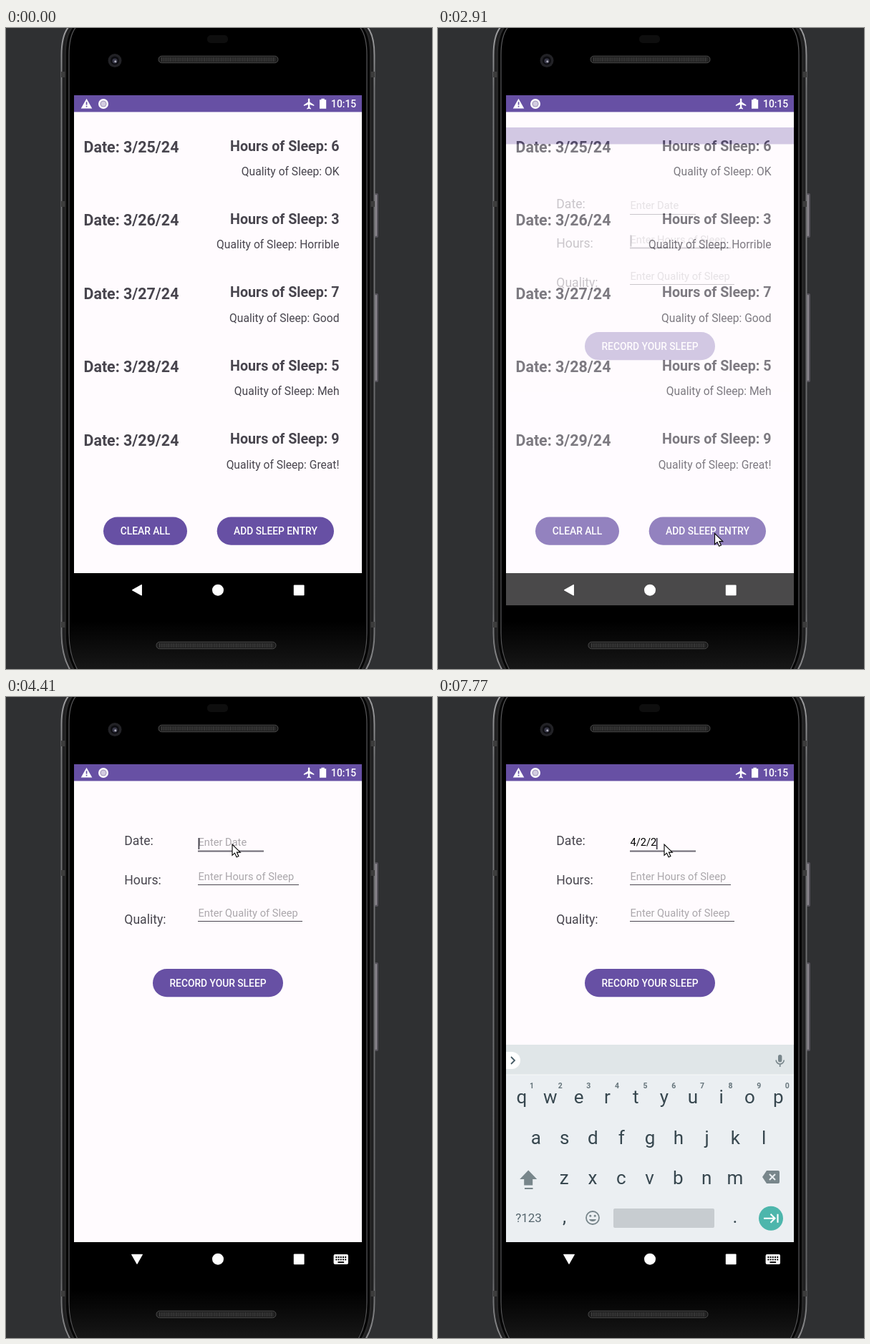
An HTML page that plays this animation: 595 by 896 pixels, repeating every 8000 ms.

```html
<!DOCTYPE html>
<html lang="en">
<head>
<meta charset="utf-8">
<title>Sleep log</title>
<style>
html, body { margin: 0; width: 100%; height: 100%; overflow: hidden; background: #2f3032; }
svg { display: block; width: 595px; height: 896px; font-family: Roboto, Arial, sans-serif; }
.date { font: 700 21.4px Roboto, sans-serif; fill: #48454e; }
.hours { font: 700 19.65px Roboto, sans-serif; fill: #48454e; text-anchor: end; }
.quality { font-size: 15.63px; fill: #48454e; text-anchor: end; }
.btn { font: 500 13.8px Roboto, sans-serif; fill: #fff; text-anchor: middle; }
.label { font-size: 17.6px; fill: #48454e; }
.hint { font-size: 14.65px; fill: #aaa7ab; }
.typed { font-size: 14.65px; fill: #000; }
.key { font-size: 26px; fill: #37474f; text-anchor: middle; }
.num { font: 700 10.5px Roboto, sans-serif; fill: #66757c; text-anchor: middle; }
</style>
</head>
<body>
<svg id="stage" viewBox="0 0 595 896"></svg>
<script>
const PURPLE = '#6750a4', PAPER = '#fffbfe', GREY = '#78868b';
const rect = (x, y, w, h, fill, r = 0, more = '') =>
  `<rect x="${x}" y="${y}" width="${w}" height="${h}" rx="${r}" fill="${fill}" ${more}/>`;
const disc = (x, y, r, fill, more = '') => `<circle cx="${x}" cy="${y}" r="${r}" fill="${fill}" ${more}/>`;
const path = (d, fill, more = '') => `<path d="${d}" fill="${fill}" ${more}/>`;
const line = (d, color, w) => path(d, 'none', `stroke="${color}" stroke-width="${w}"`);
const text = (cls, x, y, s, more = '') => `<text class="${cls}" x="${x}" y="${y}" ${more}>${s}</text>`;
const button = (x, y, w, s) => rect(x, y, w, 39.2, PURPLE, 19.6) + text('btn', x + w / 2, y + 24.8, s);
const page = rect(95, 94, 402, 668, PAPER) + rect(95, 94, 402, 23.4, PURPLE);

// phone outline inset by d from its outer edge
function shell(d, fill, stroke, w) {
  const l = 77.5 + d, r = 514.5 - d;
  return path(`M${l + 15} -6Q${l} 4 ${l} 38V846Q${l} 880 ${l + 15} 902H${r - 15}Q${r} 880 ${r} 846V38Q${r} 4 ${r - 15} -6Z`,
    fill, `stroke="${stroke}" stroke-width="${w}"`);
}

function phone() {
  const speaker = (x, y) => rect(x, y, 167, 9.5, '#1d1d1d', 4.5, 'stroke="#4a4a4a"') +
    `<path d="M${x + 4} ${y + 4.8}h159" stroke="#474747" stroke-width="6" stroke-dasharray="1 1.4"/>`;
  const side = (y, h) => rect(514, y, 6, h, '#55525a', 2) + rect(515.5, y + 2, 2.5, h - 4, '#8b878e', 1);
  const bands = [65, 246, 834].map(y => rect(77, y - 4, 6, 8, '#3d3d3d') + rect(509, y - 4, 6, 8, '#3d3d3d')).join('');
  return side(231, 62) + side(371, 124) +
    shell(0, '#202021', 'url(#rim)', 2) + bands +
    shell(5.5, '#060606', '#2c2c2d', 1.5) + shell(10.5, 'url(#glass)', '#58585a', 1.2) +
    rect(281, 10, 29, 11, '#0e0e0e', 5) +
    disc(152, 45.5, 9.5, '#222226') + disc(152, 45.5, 6, '#0c0c10') + disc(152, 46, 3.6, '#383848') + disc(152.8, 46.8, 1.5, '#b0b0bc') +
    speaker(213, 39.2) + speaker(210, 858.2);
}

function list() {
  const rows = [[6, 'OK'], [3, 'Horrible'], [7, 'Good'], [5, 'Meh'], [9, 'Great!']];
  return page + rows.map(([hours, quality], i) => {
    const y = i * 102.4;
    return text('date', 108.5, 174 + y, `Date: 3/${25 + i}/24`) +
      text('hours', 465.5, 171.6 + y, `Hours of Sleep: ${hours}`) +
      text('quality', 465.5, 206 + y, `Quality of Sleep: ${quality}`);
  }).join('') + button(136, 683.6, 117, 'CLEAR ALL') + rect(294.7, 683.6, 163.3, 39.2, PURPLE, 19.6) +
    `<g id="ripple" clip-path="url(#pill)">${rect(294, 683, 165, 41, '#fff', 0, 'opacity=".14"')}
     ${disc(378, 704, 0, '#fff', 'id="wave1" opacity=".07"')}${disc(376.5, 704, 0, '#fff', 'id="wave2" opacity=".1"')}</g>` +
    text('btn', 376.4, 708.4, 'ADD SLEEP ENTRY') + rect(95, 94, 402, 668, '#000', 0, 'id="dim"');
}

function form() {
  const fields = [['Date', 'Date', 360, 207, 208.4, 215.5], ['Hours', 'Hours of Sleep', 409, 262, 256, 262.5],
    ['Quality', 'Quality of Sleep', 414, 317, 307, 313.5]];
  return page + fields.map(([name, hint, end, labelY, hintY, lineY], i) =>
    text('label', 165.3, labelY, name + ':') + text('hint', 268.5, hintY, 'Enter ' + hint, `id="hint${i}"`) +
    `<path id="line${i}" d="M268 ${lineY}H${end}"/>`).join('') +
    text('typed', 268.5, 208.4, '', 'id="typed"') +
    rect(268.5, 197, 1.8, 16, '#47434d', 0, 'id="caret"') +
    button(205, 380.1, 182, 'RECORD YOUR SLEEP');
}

function keyboard() {
  const row = (keys, x, y) => [...keys].map((k, i) => text('key', x + i * 39.8, y, k)).join('');
  return rect(95, 486, 402, 276, '#ebeff2') + rect(95, 486, 402, 42, '#e0e6e8') + rect(95, 527.5, 402, 1, '#f7f9fa') +
    path('M95 496h8a12 12 0 0 1 0 24h-8z', '#fff') + line('M102 503l5 5-5 5', '#455a64', 1.8) +
    rect(475, 500, 5.4, 10.5, GREY, 2.7) + line('M472.2 507.5a5.5 5.5 0 0 0 11 0M477.7 513v4', GREY, 1.6) +
    row('qwertyuiop', 117, 568.4) + row('asdfghjkl', 136.8, 625) + row('zxcvbnm', 176.2, 681.3) +
    [...'1234567890'].map((n, i) => text('num', 131 + i * 39.65, 547, n)).join('') +
    path('M126.2 661.6l12 12.5h-6v8.5h-12v-8.5h-6z', GREY) + rect(121, 686, 11.5, 2, GREY) +
    path('M453 671l6-9h16q2 0 2 2v14q0 2-2 2h-16z', GREY) + line('M463 667l8 8m0-8l-8 8', '#ebeff2', 2) +
    text('key', 126.5, 734.3, '?123', 'style="font-size:17px;fill:#55656d"') +
    text('key', 176.5, 735, ',') + text('key', 415, 735, '.') +
    disc(216, 728, 9, 'none', `stroke="${GREY}" stroke-width="1.8"`) + disc(212.8, 725.3, 1.5, GREY) + disc(219.2, 725.3, 1.5, GREY) +
    path('M211 730h10a5.2 4 0 0 1-10 0z', GREY) +
    rect(245, 715, 141, 27, '#c7ccd0', 2) +
    disc(465, 728.7, 17, '#4db6ac') + line('M455 728.7h15.5m-6-6l6 6-6 6M474.5 722.7v12', '#fff', 2.1);
}

function systemIcons() {
  const keys = [0, 1, 2, 3, 4].map(i => rect(460.4 + i * 3.2, 782, 2, 2, '#000') + rect(460.4 + i * 3.2, 785.4, 2, 2, '#000')).join('');
  return path('M112.5 98.8l7.8 13.6h-15.6z', '#fff') + rect(111.7, 103.3, 1.7, 4.2, PURPLE) + rect(111.7, 108.8, 1.7, 1.7, PURPLE) +
    disc(136, 106, 7, '#fff') + disc(136, 106, 4.6, '#aaa1c2') + disc(136, 106, 3.2, '#d2cce0') +
    path('M430.3 109v-1.6l-6-3.8v-4a1.2 1.2 0 0 0-2.4 0v4l-6 3.8v1.6l6-1.9v4l-1.6 1.2v1.2l2.8-.8 2.8.8v-1.2l-1.6-1.2v-4z', '#fff') +
    path('M438 100.3h2.4v-1.6h4.4v1.6h2.4v12.5h-9.2z', '#fff') +
    text('', 454, 111.2, '10:15', 'fill="#fff" font-size="13.9" font-weight="500"') +
    path('', '#fff', 'id="back" stroke="#fff" stroke-linejoin="round"') + disc(296, 785.7, 8, '#fff') + rect(401.8, 778.4, 14.8, 14.8, '#fff', 1) +
    `<g id="imeIcon">${rect(457.6, 779, 20.4, 14, '#fff', 2)}${keys}${rect(463.5, 789.2, 8.6, 1.8, '#000')}</g>`;
}

document.getElementById('stage').innerHTML = `<defs>
  <linearGradient id="glass" x2="0" y2="1"><stop offset=".92"/><stop offset="1" stop-color="#191919"/></linearGradient>
  <linearGradient id="rim" x2="0" y2="1"><stop stop-color="#a2a2a4"/><stop offset=".1" stop-color="#737476"/>
    <stop offset=".9" stop-color="#636466"/><stop offset="1" stop-color="#8e8e90"/></linearGradient>
  <clipPath id="pill">${rect(294.7, 683.6, 163.3, 39.2, '#000', 19.6)}</clipPath>
  <clipPath id="screen">${rect(95, 94, 402, 714, '#000')}</clipPath></defs>
  ${rect(0, 0, 595, 896, '#2f3032')}${phone()}${list()}
  <g clip-path="url(#screen)"><g id="form">${form()}</g><g id="keyboard">${keyboard()}</g></g>
  ${systemIcons()}
  ${path('M.5 .5V15.8L4 12.6L6.6 18.2L9.4 17L6.9 11.6H11.8Z', '#fff', 'id="cursor" stroke="#000" stroke-width="1.1"')}`;

const $ = id => document.getElementById(id);
const set = (id, attrs) => { for (const k in attrs) $(id).setAttribute(k, attrs[k]); };
const clamp = v => Math.max(0, Math.min(1, v));
const smooth = p => p * p * (3 - 2 * p);
// progress from a to b in n held steps
const steps = (t, a, b, n) => clamp(Math.floor((t - a) / (b - a) * (n - 1) + .01) / (n - 1));
const held = (t, rows) => rows.filter(r => r[0] <= t).pop();
const between = (t, a, b) => t >= a && t < b;

// time, slide offset, opacity, dimming of the page below
const opening = [[0, 57, 0, 0], [2780, 57, .02, 0], [2910, 45, .29, 0], [2980, 23, .68, .06], [3050, 7.6, .965, .13], [3260, 0, 1, 0]];
const typing = [[0, ''], [5300, '4'], [6230, '4/'], [6700, '4/2'], [7230, '4/2/'], [7700, '4/2/2']];

function cursorAt(t) {
  if (t < 3400) {
    const p = smooth(steps(t, 130, 740, 9));
    return [498 - 112 * p, 860 - 154 * p];
  }
  const p = smooth(steps(t, 3400, 4010, 10)), q = steps(t, 4140, 4210, 2);
  return [386 - 69 * p - 1.5 * q, 706 - 516 * p + 15.5 * q];
}

function draw(t) {
  const [x, y] = cursorAt(t);
  set('cursor', { transform: `translate(${x} ${y})`, opacity: t < 130 ? 0 : 1 });

  const press = steps(t, 1660, 2170, 8);
  set('ripple', { opacity: t < 1660 || t >= 2440 ? 0 : t >= 2370 ? .5 : clamp(.3 + press * 1.6) });
  set('wave1', { r: 10 + 100 * press });
  set('wave2', { r: Math.max(0, 110 * press - 27) });

  const [, shift, alpha, dim] = held(t, opening);
  set('form', { transform: `translate(0 ${shift})`, opacity: alpha });
  set('dim', { opacity: dim });

  const dateFocus = t >= 4270, typed = held(t, typing)[1];
  [dateFocus, !dateFocus, false].forEach((on, i) =>
    set('line' + i, { stroke: on ? '#6c6873' : '#4b4751', 'stroke-width': on ? 2 : 1 }));
  $('typed').textContent = typed;
  set('hint0', { opacity: typed ? 0 : 1 });
  const caretOn = !between(t, 3530, 4010) && !between(t, 4760, 5300) && !between(t, 5960, 6230);
  set('caret', {
    x: 268.5 + (typed ? $('typed').getComputedTextLength() - .5 : 0),
    y: dateFocus ? 197 : 244.5,
    opacity: caretOn ? 1 : 0
  });

  const rise = t < 4550 ? 0 : .2 + .8 * steps(t, 4550, 4820, 5);
  set('keyboard', { transform: `translate(0 ${28.75 * (1 - rise)})`, opacity: rise });
  const ime = t >= 4410;
  set('back', { d: ime ? 'M175.5 779.3h15l-7.5 13.2z' : 'M189.4 778.3v14.8l-13.2-7.4z' });
  set('imeIcon', { opacity: ime ? 1 : 0 });
}

const start = performance.now();
function tick(now) {
  draw(Math.max(0, now - start) % 8000);
  requestAnimationFrame(tick);
}
draw(0);
requestAnimationFrame(tick);
</script>
</body>
</html>
```
